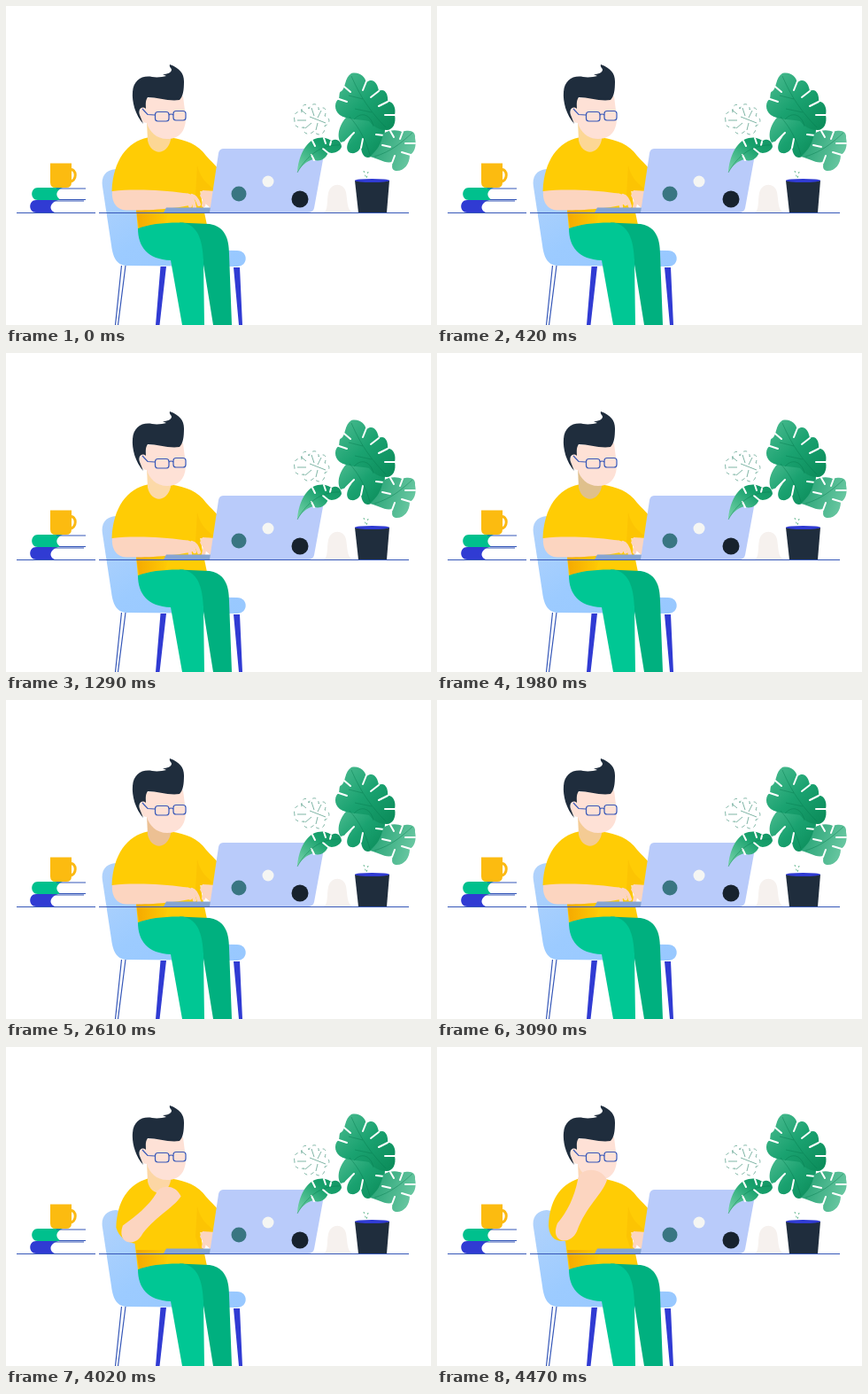
Write an HTML page that moves like this. It is 480 px wide and 360 px high and loops after 4.5 s.

```html
<!DOCTYPE html>
<html lang="en">
<head>
<meta charset="utf-8">
<title>At the desk</title>
<style>
html, body { margin: 0; width: 100%; height: 100%; overflow: hidden; background: #fff; }
svg { display: block; width: 100vw; height: 100vh; }
.line { fill: none; stroke: #3557b8; stroke-width: 1.2; }
.cut { fill: none; stroke: #fff; stroke-width: 2; stroke-linecap: round; }
.vein { fill: none; stroke: #07794d; stroke-width: .7; opacity: .6; }
.finger { fill: none; stroke: #fcd5c0; stroke-width: 4.2; stroke-linecap: round; }
.skin { fill: #fcd5c0; }
.ink { fill: #1f2d3d; }
.blue { fill: #303bd3; }
</style>
</head>
<body>
<svg viewBox="0 0 480 360">
  <defs>
    <linearGradient id="chair" x1="0" y1="0" x2="1" y2="1">
      <stop offset="0" stop-color="#b3d3fb"/><stop offset=".5" stop-color="#9ccbff"/><stop offset="1" stop-color="#98c8ff"/>
    </linearGradient>
    <linearGradient id="shade" x1="0" y1="0" x2="1" y2="0">
      <stop offset="0" stop-color="#f5a900"/><stop offset="1" stop-color="#ffcc05"/>
    </linearGradient>
    <linearGradient id="leaf" x1="0" y1="0" x2="1" y2="1">
      <stop offset="0" stop-color="#4fbd92"/><stop offset=".5" stop-color="#1aa270"/><stop offset="1" stop-color="#0a8a58"/>
    </linearGradient>
    <linearGradient id="pale" x1="0" y1="1" x2="1" y2="0">
      <stop offset="0" stop-color="#7bd5ae"/><stop offset=".65" stop-color="#18a16c"/><stop offset="1" stop-color="#129463"/>
    </linearGradient>
    <linearGradient id="side" x1="0" y1="0" x2="1" y2=".3">
      <stop offset="0" stop-color="#1f9f70"/><stop offset="1" stop-color="#67c6a0"/>
    </linearGradient>
  </defs>

  <!-- chair -->
  <path fill="url(#chair)" d="M124 184C112 185 107 193 109 204L119 270C121 286 126 293 138 293L261 294C274 294 274 276 261 276L200 275L200 200Z"/>
  <path class="line" d="M130.500 293L123.500 360M135 293L126.500 360"/>
  <path class="blue" d="M174.500 294H181L173.500 360H169ZM257 295H264L267 360H263Z"/>

  <!-- torso -->
  <path id="torso" fill="#ffcc05"/>
  <path fill="url(#shade)" d="M147 229H185L178 250H150Z"/>
  <path fill="#f6b500" opacity=".35" d="M216 180C219 192 224 198 235 207L222 209L219 229L214 214Z"/>

  <!-- trousers -->
  <path fill="#00b07f" d="M196 244.500L230 246C247 249 252 262 252 280L255 360H234L222 285Z"/>
  <path fill="#00c794" d="M149 251C162 246 180 244 200 244.500C216 248 222 262 223 288L224 360H199L186 287C160 286 149 272 149 251Z"/>

  <!-- head -->
  <path id="neck" d="M159 130L160 152C164 169 182 169 186 151L186 140Z"/>
  <path fill="#fee1d6" d="M154 104L200 102L203 126C203 142 195 150 182 150C170 150 162 142 159 132C150 132 148 119 154 114Z"/>
  <path class="ink" d="M143 97C144 84 153 78 165 80C171 81 177 80 181 79L177 77C182 77 187 75 187 72C187 70 184 69 185 66C196 70 201 76 201 85C201 95 200 102 196 106C184 108 172 103 160 103C157 107 158 112 158 116C153 112 149 117 151 123L155 133C146 123 142 108 143 97Z"/>
  <g class="line">
    <rect x="168.500" y="119.500" width="15.500" height="10.500" rx="3"/>
    <rect x="189" y="118.500" width="14" height="10.500" rx="3"/>
    <path d="M154 116L160 122.500L168 123M184 123Q186.500 121 189 123"/>
  </g>

  <!-- hands -->
  <path id="arm" class="skin"/>
  <g id="left"><path class="finger"/><path class="finger"/><path class="finger"/></g>
  <path class="skin" d="M222 208L236 209L231 228L224 222L219 214Z"/>
  <path id="right" class="finger"/>

  <!-- laptop -->
  <path fill="#86a5d3" d="M181 227.500H231V233H178Z"/>
  <path fill="#b9cbfa" d="M246 161H354Q361 161 359 168L348 228Q347 233 341 233H230L240 166Q241 161 246 161Z"/>
  <circle cx="263" cy="212" r="8.500" fill="#397682"/>
  <circle cx="296" cy="198" r="6.500" fill="#f5f6f3"/>
  <circle cx="332" cy="218" r="9.500" fill="#17222e"/>

  <!-- books and mug -->
  <path fill="#00c08d" d="M36 205H64C56 208 55 215 62 219H36C27 219 27 205 36 205Z"/>
  <path class="blue" d="M34 219H59C49 222 48 230 55 233H34C25 233 25 219 34 219Z"/>
  <path class="line" d="M57 206H90M60 218.500H90M52 220H88"/>
  <path fill="none" stroke="#fbb914" stroke-width="3" d="M72 185C80 182 81 199 71 198"/>
  <path fill="#fcbb10" d="M50 177.500H74V199Q74 205 68 205H56Q50 205 50 199Z"/>

  <!-- hump and pot -->
  <path fill="#f6f1ee" d="M359 233C364 230 362 222 364 211C367 199 381 199 384 210C386 222 385 229 391 233Z"/>
  <path class="ink" d="M394 197H433L430 233H398Z"/>
  <ellipse class="blue" cx="413.500" cy="197" rx="19.500" ry="2"/>
  <path fill="none" stroke="#62b58d" stroke-dasharray="2 3" d="M404 186L407 195M409 187L407 195"/>

  <!-- plant -->
  <path fill="url(#leaf)" d="M388 122C376 132 373 147 378 154C382 153 387 150 391 147C383 156 384 165 390 166C396 167 400 162 401 158C401 169 407 173 412 170C423 165 428 152 428 139C423 125 402 117 388 122Z"/>
  <path fill="url(#leaf)" d="M390 76C400 74 405 80 407 86C415 80 420 88 421 96C428 92 432 100 431 108C437 107 441 115 439 123C441 132 437 140 430 140C422 140 416 137 410 130C400 128 384 128 377 123C370 118 371 107 376 105C377 99 376 97 379 96C384 92 382 81 390 76Z"/>
  <path class="cut" d="M373 104L385 108M382 91L389 97M407 85L403 95M421 96L412 103M431 108L421 113M439 123L428 123M384 152L393 143M401 160L403 150M427 146L418 145"/>
  <path class="vein" d="M390 79C397 95 407 115 429 137M388 125C398 136 406 150 411 168M403 105L387 101M413 120L394 116M393 128C403 117 413 125 415 136"/>

  <path fill="url(#side)" d="M426 144C434 139 443 140 447 142C456 139 463 141 462 149C464 158 461 166 456 168C456 179 449 187 440 186C434 184 437 180 436 176C428 178 420 172 411 170C420 162 424 155 426 144Z"/>
  <path class="cut" d="M434 141L438 148M448 142L445 150M462 155L451 155M457 168L447 165M436 177L439 169M425 157L434 159"/>
  <path class="vein" d="M459 143C448 153 436 164 416 170"/>

  <path fill="url(#pale)" d="M329 188C330 171 338 152 352 149C361 147 365 151 368 152C374 148 379 154 379 159C376 166 367 167 364 165C360 175 352 176 347 173C339 175 333 181 329 188Z"/>
  <path class="cut" stroke-width="1.500" d="M346 152L349 158M359 149L361 155M367 153L366 157M364 166L358 161M348 174L345 168"/>
  <path class="vein" d="M377 157C357 156 340 168 329 188"/>

  <g fill="none" stroke="#5fa28e" stroke-width=".8">
    <path stroke-dasharray="4 4" d="M326 130C324 121 329 118 334 120C333 111 340 108 342 116C345 108 354 110 353 117C360 112 363 117 360 124C367 126 366 134 360 135C362 144 352 149 348 141C342 147 334 144 337 137C329 138 325 135 326 130Z"/>
    <path d="M333 117L339 122M345 115L348 124M356 118L352 126M329 129L339 129M338 138L345 132M350 140L352 132M343 125L361 132"/>
  </g>

  <path class="line" style="stroke-width:1" d="M12 233.500H101M105 233.500H455"/>
</svg>
<script>
const LOOP = 4500, RAISE = 3840, RAISED = 4110, TAP = 300;
const el = id => document.getElementById(id);
const left = [...el("left").children];

// Each shape is a start point followed by cubic segments.
const arm = {
  type: [120,209, 145,206,178,208,200,211, 209,211,212,214,214,223, 195,229,160,231,136,230.5, 124,230,119,220,120,209],
  think: [136,199, 147,186,155,170,159,150, 160,137,184,133,192,150, 187,166,168,180,158,208, 150,225,127,221,136,199]
};
const sleeve = {
  type: [160,148.5, 137,153,121,174,119.5,209, 129,214,141,220,147,230],
  think: [160,148.5, 138,156,127,174,126,202, 127,214,133,220,145,219]
};
const torsoEnd = "L149 252H228L219 209L236 209L243 189C239 181 232 176 226 169C217 156 203 151 186 148.5C180 162 167 164 160 148.5Z";

const mix = (a, b, k) => a + (b - a) * k;
const ease = k => k * k * (3 - 2 * k);
const clamp = k => Math.min(1, Math.max(0, k));
const curve = (shape, k) => {
  const p = shape.type.map((v, i) => mix(v, shape.think[i], k).toFixed(2));
  return `M${p[0]} ${p[1]}C${p.slice(2).join(" ")}`;
};

el("neck").animate([
  { fill: "#fcd795", offset: 0 },
  { fill: "#fcd795", offset: .25 },
  { fill: "#fcd9aa", offset: .29 },
  { fill: "#dfc08c", offset: .44 },
  { fill: "#ecc093", offset: .58 },
  { fill: "#fcd795", offset: .8 },
  { fill: "#fcd5b5", offset: 1 }
], { duration: LOOP, iterations: Infinity });

function draw() {
  const t = performance.now() % LOOP;
  const k = ease(clamp((t - RAISE) / (RAISED - RAISE)));
  const tip = i => 225.5 + 2 * Math.sin(t / TAP * 2 * Math.PI + i * 2);

  el("arm").setAttribute("d", curve(arm, k) + "Z");
  el("torso").setAttribute("d", curve(sleeve, k) + torsoEnd);
  left.forEach((finger, i) => {
    const x = 202 + i * 4;
    finger.setAttribute("d", `M${x} 214Q${x + 5} 215 ${x + 6 + i} ${tip(i)}`);
  });
  el("left").setAttribute("opacity", clamp(1 - 4 * k));
  el("right").setAttribute("d", `M229 211Q225 216 223 ${mix(tip(3), 225, k)}`);
  requestAnimationFrame(draw);
}
draw();
</script>
</body>
</html>
```
